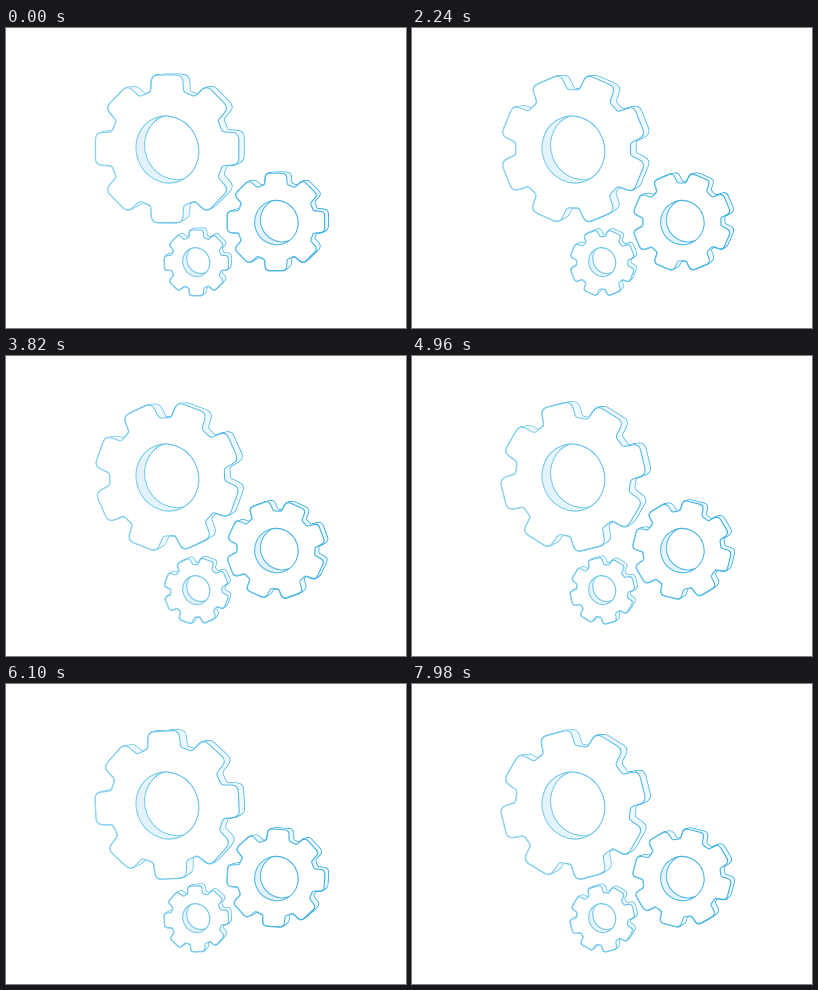
Write an HTML page that moves like this. It is 400x300 px and loops after 8 s.

```html
<!DOCTYPE html>
<html lang="en">
<head>
<meta charset="utf-8">
<title>Gears</title>
<style>
  html, body { margin: 0; width: 100%; height: 100%; overflow: hidden; background: #fff; }
  svg { display: block; width: 100%; height: 100%; }
</style>
</head>
<body>
<svg id="stage" viewBox="0 0 400 300" stroke-linejoin="round">
  <defs>
    <linearGradient id="line" gradientUnits="userSpaceOnUse" x1="100" y1="200" x2="310" y2="150">
      <stop offset="0" stop-color="#92d5ef"/>
      <stop offset=".5" stop-color="#66c3ea"/>
      <stop offset="1" stop-color="#37ade2"/>
    </linearGradient>
    <linearGradient id="bore">
      <stop offset="0" stop-color="#e2f2fb"/>
      <stop offset="1" stop-color="#f4fafd"/>
    </linearGradient>
  </defs>
</svg>
<script>
const LOOP = 8000, SPEED = 30, TEETH = 8, SLICES = 8, BACK = 0.975, TILT = -20;
const LINE = 'url(#line)', WALL = '#eff8fd', WIDTH = 1.1;
const stage = document.getElementById('stage');
const defs = stage.querySelector('defs');

// dx, dy: shift of the back face; hole: centre and radii of the bore
const gears = [
  { x: 161.2, y: 120.8, rx: 72.2, ry: 74.4, dx: 6.8, dy: -2.2, dir: -1, hole: [161.4, 121.5, 31.1, 33.8] },
  { x: 190.4, y: 234.8, rx: 32.2, ry: 33, dx: 3.3, dy: -2.4, dir: -1, hole: [190.2, 234.1, 13.4, 14.6] },
  { x: 270, y: 193.9, rx: 49, ry: 49, dx: 4.6, dy: -2, dir: 1, hole: [270.4, 194.6, 21.7, 22.2] }
];

// Half width, distance from the centre and corner size of one tooth
const tooth = [
  [-0.227, 0.765, 0.03], [-0.213, 0.992, 0.09],
  [0.213, 0.992, 0.09], [0.227, 0.765, 0.03]
];

function add(parent, tag, attrs) {
  const el = document.createElementNS('http://www.w3.org/2000/svg', tag);
  for (const key in attrs) el.setAttribute(key, attrs[key]);
  parent.append(el);
  return el;
}

function toward(a, b, dist) {
  const k = dist / Math.hypot(b[0] - a[0], b[1] - a[1]);
  return [a[0] + (b[0] - a[0]) * k, a[1] + (b[1] - a[1]) * k];
}

function outline(g, degrees) {
  const pts = [];
  for (let i = 0; i < TEETH; i++) {
    const a = (degrees + i * 360 / TEETH) * Math.PI / 180;
    const c = Math.cos(a), s = Math.sin(a);
    for (const [w, h, r] of tooth) pts.push([w * c + h * s, w * s - h * c, r]);
  }
  const at = p => (g.x + p[0] * g.rx).toFixed(2) + ' ' + (g.y + p[1] * g.ry).toFixed(2);
  const n = pts.length;
  return pts.map((p, i) => {
    const from = toward(p, pts[(i + n - 1) % n], p[2]);
    const to = toward(p, pts[(i + 1) % n], p[2]);
    return (i ? 'L' : 'M') + at(from) + 'Q' + at(p) + ' ' + at(to);
  }).join('') + 'Z';
}

function build(g, i) {
  const id = 'gear' + i;
  g.path = add(defs, 'path', { id });
  const slices = attrs => {
    const group = add(stage, 'g', attrs);
    for (let k = SLICES; k >= 0; k--) {
      const f = k / SLICES, s = 1 - (1 - BACK) * f;
      const tx = g.dx * f + g.x * (1 - s), ty = g.dy * f + g.y * (1 - s);
      add(group, 'use', { href: '#' + id, transform: `translate(${tx} ${ty}) scale(${s})` });
    }
  };
  slices({ fill: 'none', stroke: LINE, 'stroke-width': WIDTH * 1.6 });
  slices({ fill: WALL });
  add(stage, 'use', { href: '#' + id, fill: '#fff', stroke: LINE, 'stroke-width': WIDTH });

  const [cx, cy, rx, ry] = g.hole;
  const oval = (x, y, k) => ({ cx: x, cy: y, rx: rx * k, ry: ry * k, transform: `rotate(${TILT} ${x} ${y})` });
  const rim = oval(cx, cy, 1);
  const clip = add(defs, 'clipPath', { id: id + 'hole' });
  add(clip, 'ellipse', rim);
  add(stage, 'ellipse', { ...rim, fill: 'url(#bore)' });
  const inside = add(stage, 'g', { 'clip-path': `url(#${id}hole)` });
  add(inside, 'ellipse', {
    ...oval(cx + g.dx * 1.15, cy + g.dy * 1.15, BACK),
    fill: '#fff', stroke: LINE, 'stroke-width': WIDTH
  });
  add(stage, 'ellipse', { ...rim, fill: 'none', stroke: LINE, 'stroke-width': WIDTH });
}

function draw(now) {
  const angle = (now % LOOP) / 1000 * SPEED;
  for (const g of gears) g.path.setAttribute('d', outline(g, g.dir * angle));
}

function tick() {
  draw(performance.now());
  requestAnimationFrame(tick);
}

gears.forEach(build);
tick();
</script>
</body>
</html>
```
